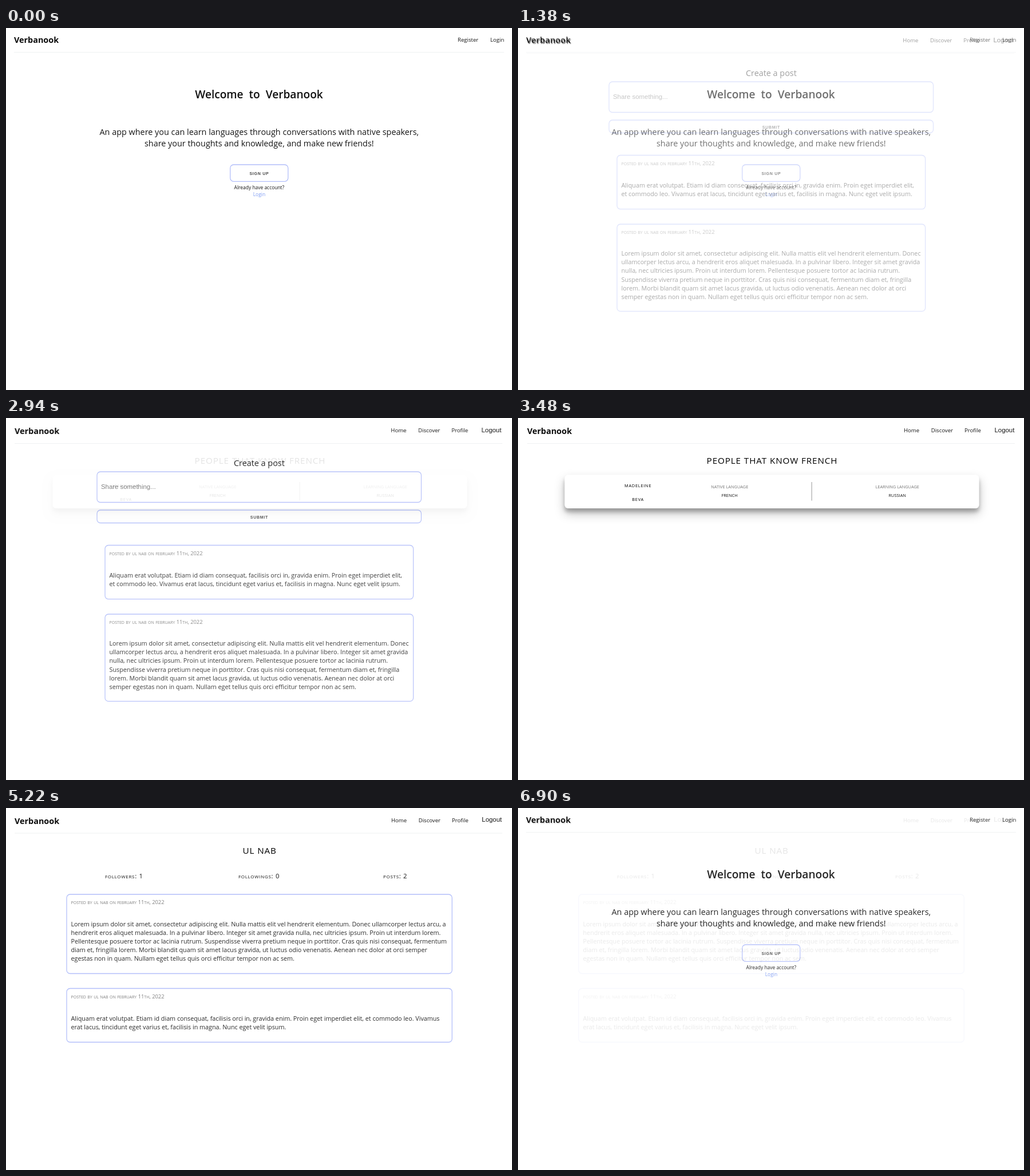
An HTML page with a canvas that plays this animation: 884x633 px, repeating every 6960 ms.

```html
<!DOCTYPE html>
<html lang="en">
<head>
<meta charset="utf-8">
<title>Language exchange app</title>
<style>
  html, body { margin: 0; width: 100%; height: 100%; overflow: hidden; background: #fff; }
  canvas { display: block; }
</style>
</head>
<body>
<canvas id="stage" width="884" height="633"></canvas>
<script>
const W = 884, H = 633, LOOP = 6960, STEP = 60;
const UI = '"Open Sans", "Noto Sans", sans-serif';
const ARIAL = '"Liberation Sans", Arial, sans-serif';
const BORDER = '#b3bffa', INK = '#2c2c2c', DARK = '#161616';
const BRAND = 'Verbanook', AUTHOR = 'ul nab';
const META = `posted by ${AUTHOR} on february 11th, 2022`;

const stage = document.getElementById('stage').getContext('2d');
let ctx;

function text(str, x, y, size, o = {}) {
  ctx.font = `${o.weight || 400} ${size}px ${o.family || UI}`;
  ctx.fontVariantCaps = o.caps ? 'small-caps' : 'normal';
  ctx.letterSpacing = (o.spacing || 0) + 'px';
  ctx.wordSpacing = (o.words || 0) + 'px';
  ctx.textAlign = o.align || 'left';
  ctx.fillStyle = o.color || DARK;
  ctx.fillText(str, x, y);
}

const centered = (str, x, y, size, o) => text(str, x, y, size, { align: 'center', ...o });

function roundRect(x1, y1, x2, y2, r = 6) {
  ctx.beginPath();
  ctx.roundRect(x1, y1, x2 - x1, y2 - y1, r);
}

function outline(...box) {
  roundRect(...box);
  ctx.strokeStyle = BORDER;
  ctx.lineWidth = 1.27;
  ctx.stroke();
}

function button(label, y, ...box) {
  outline(...box);
  centered(label, 442.4, y, 7, { family: ARIAL, weight: 700, spacing: 0.75, color: '#444' });
}

function header(x, y, lineY, right) {
  text(BRAND, x, y, 14.4, { weight: 700, color: '#0c0c0c' });
  ctx.fillStyle = '#eff1f2';
  ctx.fillRect(x, lineY, right - x, 1);
}

function memberNav(x, y, logoutX, logoutY) {
  text('Home', x, y, 9.6);
  text('Discover', x + 47.7, y, 9.6);
  text('Profile', x + 106, y, 9.6);
  text('Logout', logoutX, logoutY, 11.4, { family: ARIAL });
}

const heading = (str, x, y) => centered(str, x, y, 15.2, { spacing: 0.92, color: '#000' });

function post(x1, y1, x2, y2, bodyY, lines) {
  outline(x1, y1, x2, y2);
  text(META, x1 + 7.5, y1 + 17.3, 9.4, { caps: true, color: '#808080' });
  lines.forEach((line, i) => text(line, x1 + 7.5, bodyY + i * 15.2, 10.76, { color: INK }));
}

function welcome() {
  header(14, 26, 42, 870);
  text('Register', 789, 23.5, 9.6);
  text('Login', 846, 23.5, 9.6);
  centered('Welcome to ' + BRAND, 442, 123, 19.1, { weight: 600, words: 5, color: '#111' });
  centered('An app where you can learn languages through conversations with native speakers,', 442.3, 187, 14.4);
  centered('share your thoughts and knowledge, and make new friends!', 442.3, 207, 14.4);
  button('SIGN UP', 256.7, 391.7, 239, 492.8, 268.3);
  centered('Already have account?', 442.4, 281.5, 8.45);
  centered('Login', 442.4, 293.5, 8.45, { color: '#7e9cf3' });
}

function feed() {
  header(15, 28, 44, 867);
  memberNav(672.3, 25, 830.5, 24.5);
  centered('Create a post', 442.4, 83.5, 14.4);
  outline(159, 94, 725.5, 147.5);
  text('Share something...', 166, 124, 11.4, { family: ARIAL, color: '#757575' });
  button('SUBMIT', 175.5, 159, 161, 725.5, 183.5);
  post(173, 222.5, 711.6, 316.7, 279, [
    'Aliquam erat volutpat. Etiam id diam consequat, facilisis orci in, gravida enim. Proin eget imperdiet elit,',
    'et commodo leo. Vivamus erat lacus, tincidunt eget varius et, facilisis in magna. Nunc eget velit ipsum.'
  ]);
  post(173, 343, 711.6, 495.4, 398, [
    'Lorem ipsum dolor sit amet, consectetur adipiscing elit. Nulla mattis elit vel hendrerit elementum. Donec',
    'ullamcorper lectus arcu, a hendrerit eros aliquet malesuada. In a pulvinar libero. Integer sit amet gravida',
    'nulla, nec ultricies ipsum. Proin ut interdum lorem. Pellentesque posuere tortor ac lacinia rutrum.',
    'Suspendisse viverra pretium neque in porttitor. Cras quis nisi consequat, fermentum diam et, fringilla',
    'lorem. Morbi blandit quam sit amet lacus gravida, ut luctus odio venenatis. Aenean nec dolor at orci',
    'semper egestas non in quam. Nullam eget tellus quis orci efficitur tempor non ac sem.'
  ]);
}

function shadowCard(dy, blur, alpha) {
  ctx.save();
  ctx.shadowColor = `rgba(0,0,0,${alpha})`;
  ctx.shadowOffsetY = dy;
  ctx.shadowBlur = blur;
  ctx.fillStyle = '#fff';
  roundRect(81.5, 99.5, 805.5, 158);
  ctx.fill();
  ctx.restore();
}

function discover() {
  header(16, 28, 44, 868);
  memberNav(674, 25, 832.5, 24.5);
  heading('PEOPLE THAT KNOW FRENCH', 444, 80);
  shadowCard(8.9, 17.8, 0.25);
  shadowCard(6.3, 6.3, 0.24);
  ctx.fillStyle = '#a0a0a0';
  ctx.fillRect(512.6, 112, 1.1, 32.5);
  const name = { spacing: 0.75, color: '#000' };
  centered('MADELEINE', 209.6, 120.8, 7.4, name);
  centered('BEVA', 209.6, 145, 7.4, name);
  const grey = { color: '#777' };
  centered('NATIVE LANGUAGE', 369.7, 123, 7.4, grey);
  centered('FRENCH', 369.5, 138.2, 7.4);
  centered('LEARNING LANGUAGE', 662.7, 123, 7.4, grey);
  centered('RUSSIAN', 662.7, 138.2, 7.4);
}

function profile() {
  header(15, 27.5, 43.5, 867);
  memberNav(673, 24.5, 831.3, 24);
  heading(AUTHOR.toUpperCase(), 443.2, 79.7);
  const stat = { caps: true, spacing: 0.7 };
  text('followers: 1', 173, 123, 11.3, stat);
  text('followings: 0', 406, 123, 11.3, stat);
  text('posts: 2', 659, 123, 11.3, stat);
  post(106, 151, 779.3, 289.5, 206.5, [
    'Lorem ipsum dolor sit amet, consectetur adipiscing elit. Nulla mattis elit vel hendrerit elementum. Donec ullamcorper lectus arcu, a',
    'hendrerit eros aliquet malesuada. In a pulvinar libero. Integer sit amet gravida nulla, nec ultricies ipsum. Proin ut interdum lorem.',
    'Pellentesque posuere tortor ac lacinia rutrum. Suspendisse viverra pretium neque in porttitor. Cras quis nisi consequat, fermentum',
    'diam et, fringilla lorem. Morbi blandit quam sit amet lacus gravida, ut luctus odio venenatis. Aenean nec dolor at orci semper',
    'egestas non in quam. Nullam eget tellus quis orci efficitur tempor non ac sem.'
  ]);
  post(106, 315.5, 779.3, 409.5, 372, [
    'Aliquam erat volutpat. Etiam id diam consequat, facilisis orci in, gravida enim. Proin eget imperdiet elit, et commodo leo. Vivamus',
    'erat lacus, tincidunt eget varius et, facilisis in magna. Nunc eget velit ipsum.'
  ]);
}

function render(paint) {
  const layer = document.createElement('canvas');
  layer.width = W;
  layer.height = H;
  ctx = layer.getContext('2d');
  ctx.fillStyle = '#fff';
  ctx.fillRect(0, 0, W, H);
  paint();
  return layer;
}

const pages = [welcome, feed, discover, profile].map(render);
const HOLD = 1200, PERIOD = LOOP / pages.length;

// Each page holds, then dissolves into the next in ten equal steps.
function draw(now) {
  const t = now % LOOP;
  const i = Math.floor(t / PERIOD);
  const local = t - i * PERIOD;
  const mix = local < HOLD ? 0 : Math.min(1, (Math.floor((local - HOLD) / STEP) + 1) / 10);
  stage.globalAlpha = 1;
  stage.drawImage(pages[i], 0, 0);
  if (mix) {
    stage.globalAlpha = mix;
    stage.drawImage(pages[(i + 1) % pages.length], 0, 0);
  }
}

const start = performance.now();
function tick() {
  draw(performance.now() - start);
  requestAnimationFrame(tick);
}
tick();
</script>
</body>
</html>
```
